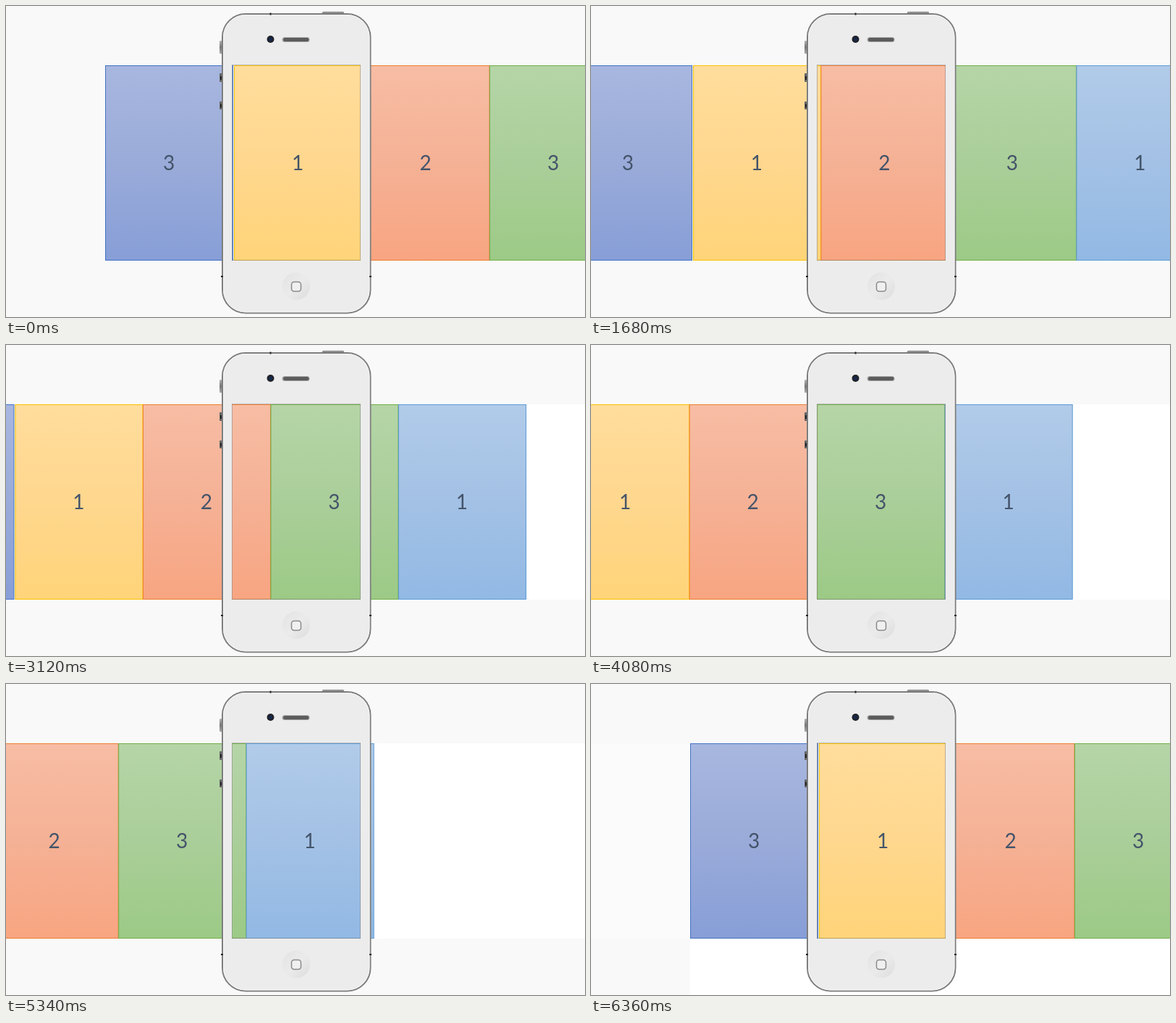
Recreate the animation shown at these times as an HTML page. Size 800 by 430 pixels, loop 7.44 s.

```html
<!DOCTYPE html>
<html lang="en">
<head>
<meta charset="utf-8">
<title>Carousel</title>
<style>
html, body { margin: 0; width: 100%; height: 100%; overflow: hidden; background: #f9f9f9; }
svg { display: block; }
text { font: 28px Lato, Carlito, sans-serif; fill: #44546a; text-anchor: middle; }
</style>
</head>
<body>
<svg width="800" height="430" viewBox="0 0 800 430">
  <defs id="defs">
    <linearGradient id="metal" x2="0" y2="1">
      <stop stop-color="#b5b5b5"/><stop offset=".5" stop-color="#777"/><stop offset="1" stop-color="#aaa"/>
    </linearGradient>
    <linearGradient id="home" x2="1" y2="1">
      <stop stop-color="#e2e2e2"/><stop offset=".5" stop-color="#ebebeb"/><stop offset="1" stop-color="#dcdcdc"/>
    </linearGradient>
    <g id="cards"></g>
  </defs>

  <g id="strip">
    <rect x="1022" y="82" width="800" height="270" fill="#fff"/>
    <use href="#cards"/>
  </g>
  <g id="fresh">
    <rect width="800" height="430" fill="#f9f9f9"/>
    <rect y="82" width="137" height="270" fill="#fbfbfb"/>
    <rect x="137" y="352" width="663" height="78" fill="#fff"/>
    <use href="#cards"/>
  </g>

  <g id="phone">
    <rect x="437" y="7.5" width="30" height="5" rx="1.5" fill="url(#metal)"/>
    <rect x="295" y="48" width="5" height="18" rx="1" fill="url(#metal)"/>
    <g fill="#666">
      <rect x="295" y="93" width="4" height="12" rx="1"/>
      <rect x="295" y="132" width="4" height="11" rx="1"/>
    </g>
    <g fill="#222">
      <rect x="296" y="97" width="2.5" height="5"/>
      <rect x="296" y="135.500" width="2.5" height="5"/>
    </g>
    <path fill="#ececec" fill-rule="evenodd" d="M331 11H472a32 32 0 0 1 32 32V392a32 32 0 0 1-32 32H331a32 32 0 0 1-32-32V43a32 32 0 0 1 32-32ZM312 81V352H490V81Z"/>
    <rect x="299" y="11" width="204.500" height="413.500" rx="32" fill="none" stroke="#7d7d7d" stroke-width="2"/>
    <rect x="300.500" y="12.500" width="201.500" height="410.500" rx="30.500" fill="none" stroke="#f5f5f5"/>
    <rect x="312.500" y="81.500" width="177" height="270" fill="none" stroke="#888" stroke-opacity=".55"/>
    <path stroke="#222" stroke-width="2" d="M297 374h3M502 374h3M365.500 9.500v3"/>
    <circle cx="365.500" cy="46" r="5" fill="#20222a"/>
    <circle cx="365.500" cy="46" r="2.500" fill="#14284d"/>
    <rect x="381.500" y="43" width="38" height="7" rx="3.500" fill="#aaa"/>
    <rect x="383" y="44" width="35.500" height="5" rx="2.500" fill="#5c5c5c"/>
    <circle cx="401" cy="387.500" r="19" fill="url(#home)"/>
    <rect x="394.500" y="381.500" width="13" height="13" rx="3.500" fill="#f0f0f0" stroke="#8a8a8a" stroke-width="1.500"/>
  </g>
</svg>
<script>
const LOOP = 7440, STEP = 60, SLIDE = 1820;
const $ = id => document.getElementById(id);

// left edge, label, border, gradient top / middle / bottom
const cards = [
  [137, 3, '#4472c4', '#a8b7df', '#9aabd9', '#879ed7'],
  [315, 1, '#ffc000', '#ffdd9c', '#ffd78e', '#ffd479'],
  [491.5, 2, '#ed7d31', '#f7bda4', '#f5b195', '#f8a581'],
  [668, 3, '#70ad47', '#b5d5a7', '#aace99', '#9cca86'],
  [844.5, 1, '#5b9bd5', '#b1cbe9', '#a3c1e5', '#92b9e4']
];
// start time, distance
const slides = [[75, 176.5], [2005, 179], [3975, 175.5]];

let grads = '', shapes = '';
cards.forEach(([x, label, edge, ...tones], i) => {
  const stops = tones.map((c, k) => `<stop offset="${k / 2}" stop-color="${c}"/>`).join('');
  grads += `<linearGradient id="c${i}" x2="0" y2="1">${stops}</linearGradient>`;
  shapes += `<rect x="${x + .5}" y="82.5" width="176" height="269" fill="url(#c${i})" stroke="${edge}"/>
    <text x="${x + 88}" y="227">${label}</text>`;
});
$('cards').innerHTML = shapes;
$('defs').insertAdjacentHTML('beforeend', grads);

const clamp = u => Math.min(1, Math.max(0, u));
const ease = u => u * u * u * (10 - 15 * u + 6 * u * u);

function draw(now) {
  const t = Math.floor(now % LOOP / STEP) * STEP;
  const x = slides.reduce((sum, [start, d]) => sum + d * ease(clamp((t - start) / SLIDE)), 0);
  $('strip').setAttribute('transform', `translate(${-x.toFixed(2)})`);
  $('fresh').setAttribute('opacity', clamp((t - 5880) / 480));
}

let begin;
function tick(now) {
  begin ??= now;
  draw(now - begin);
  requestAnimationFrame(tick);
}
draw(0);
requestAnimationFrame(tick);
</script>
</body>
</html>
```
